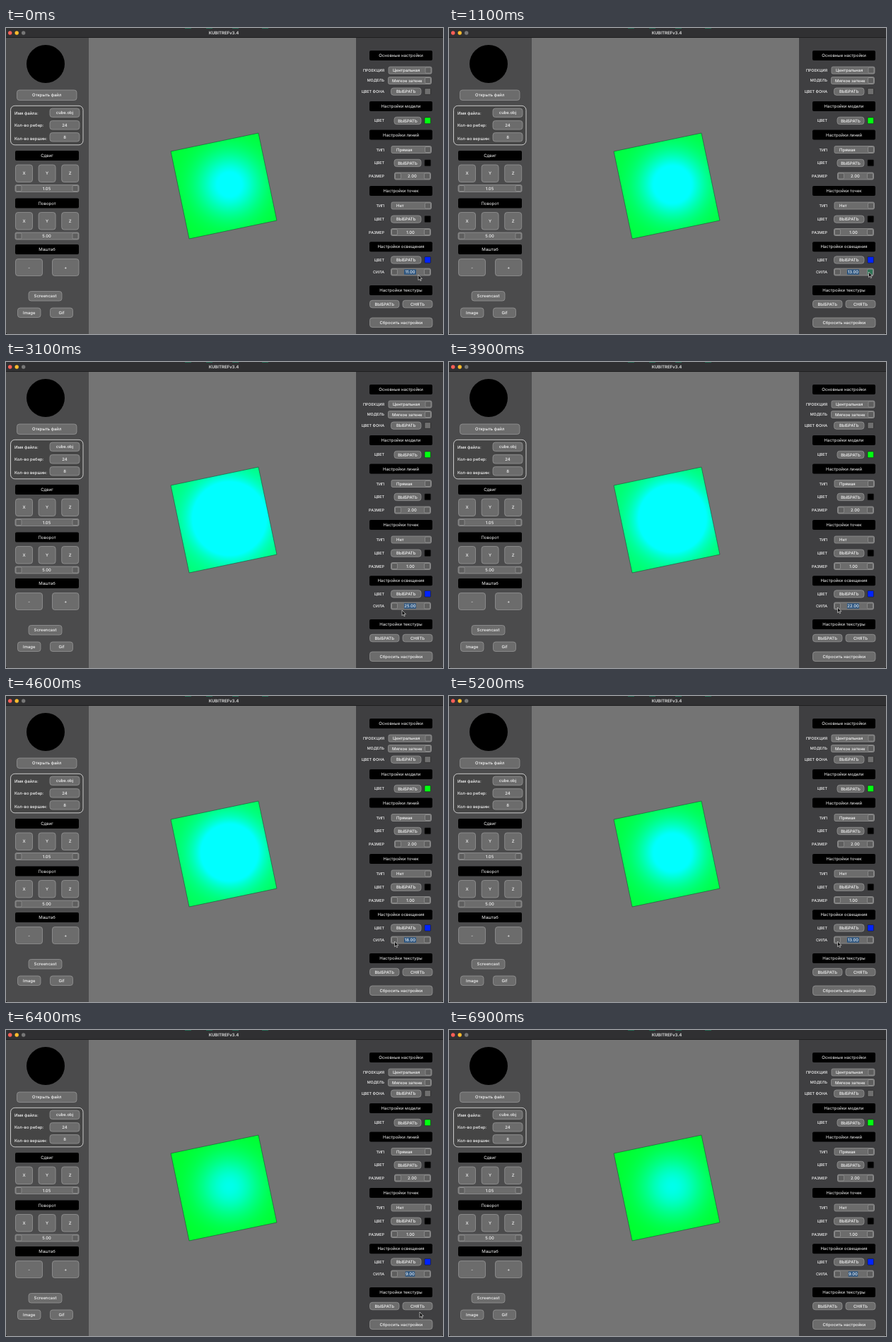
An HTML page that plays this animation: 618 px wide and 434 px high, repeating every 7.3 s.

```html
<!DOCTYPE html>
<html lang="ru">
<head>
<meta charset="utf-8">
<title>3D</title>
<style>
html, body { margin: 0; width: 100%; height: 100%; overflow: hidden; background: #1c1c1c; }
svg {
  display: block; width: 618px; height: 434px; border-radius: 0 0 4px 4px;
  font: 500 5.9px Inter, Roboto, sans-serif; fill: #f6f6f6; text-rendering: geometricPrecision;
}
.btn { fill: #6c6c6c; stroke: #9c9c9c; stroke-width: .7; }
.cap { fill: #000; }
.nub { fill: #5e5e5e; stroke: #a0a0a0; stroke-width: .6; }
.label { font-size: 5.4px; }
</style>
</head>
<body>
<svg id="stage" viewBox="0 0 618 434"></svg>
<script>
const LOOP = 7300, TICK = 100;
const stage = document.getElementById("stage");

function add(tag, attrs, parent = stage, text) {
  const el = document.createElementNS("http://www.w3.org/2000/svg", tag);
  for (const k in attrs) el.setAttribute(k, attrs[k]);
  if (text !== undefined) el.textContent = text;
  return parent.appendChild(el);
}
const rect = (x, y, width, height, attrs) => add("rect", { x, y, width, height, ...attrs });
const text = (x, y, str, attrs) => add("text", { x, y, ...attrs }, stage, str);
const mid = (x, y, str, attrs) => text(x, y, str, { "text-anchor": "middle", ...attrs });

function button(x, y, w, h, str, r = 3.5) {
  rect(x, y, w, h, { class: "btn", rx: r });
  return mid(x + w / 2, y + h / 2 + 2.1, str);
}
function caption(x, y, w, str) {
  rect(x, y, w, 14, { class: "cap", rx: 2 });
  mid(x + w / 2, y + 9.2, str, { "font-size": 6, "font-weight": 400 });
}
function spin(x, y, w, h, str) {
  rect(x, y, w, h, { class: "btn", rx: 2 });
  rect(x + 1, y + 1, 8, h - 2, { class: "nub", rx: 1.5 });
  const up = rect(x + w - 9, y + 1, 8, h - 2, { class: "nub", rx: 1.5 });
  const value = mid(x + w / 2 - .5, y + h / 2 + 2.1, str);
  return { up, value };
}
function combo(x, y, w, tx, str) {
  rect(x, y, w, 10, { class: "btn", rx: 2 });
  text(tx, y + 7, str);
  rect(x + w - 9, y + 1, 8, 8, { class: "nub", rx: 1.5 });
}
const label = (y, str) => text(535, y, str, { class: "label", "text-anchor": "end" });
const swatch = (y, fill) => rect(592, y, 8.6, 8.8, { fill, stroke: "#1c1c1c", "stroke-width": .6, rx: 1 });

const defs = add("defs", {});

// Window
rect(0, 0, 618, 434, { fill: "#747474" });
rect(0, 14, 117, 420, { fill: "#4b4b4c" });
rect(495, 14, 123, 420, { fill: "#3f3f41" });
rect(0, 0, 618, 14, { fill: "#303032" });
rect(0, 13.3, 618, .7, { fill: "#191919" });
[253, 283, 320, 362].forEach(x => rect(x, 0, 9, .8, { fill: "#23765c" }));
["#ff5f57", "#febc2e", "#777"].forEach((fill, i) => add("circle", { cx: 5.7 + i * 9.5, cy: 7, r: 2.7, fill }));
mid(308, 9.2, "KUBITREFv3.4", { "font-size": 6, "font-weight": 700, fill: "#d0d0d0" });

// Left panel
add("circle", { cx: 56, cy: 51, r: 27, fill: "#000" });
button(15.5, 88, 84.5, 14.5, "Открыть файл");
rect(6.5, 110.3, 102.5, 55.5, { fill: "#454545", stroke: "#d8d8d8", "stroke-width": .9, rx: 6 });
[["Имя файла:", "cube.obj", 122.5, 114], ["Кол-во ребер:", "24", 140.3, 131.5], ["Кол-во вершин:", "8", 158.6, 148.5]]
  .forEach(([name, value, ly, by]) => {
    text(12, ly, name);
    button(62, by, 42, 12.5, value);
  });
[["Сдвиг", 174, "1.05"], ["Поворот", 241.5, "5.00"]].forEach(([name, y, value]) => {
  caption(13, y, 90, name);
  ["X", "Y", "Z"].forEach((axis, i) => button(13.5 + i * 32.6, y + 20, 24, 24.5, axis));
  spin(13, y + 48.5, 90, 10, value);
});
caption(13, 307, 90, "Маштаб");
button(13.5, 327.5, 38, 24, "-");
button(65.5, 327.5, 37.5, 24, "+");
button(32, 373.5, 47, 13.5, "Screencast");
button(16.5, 397, 32.5, 13.5, "Image");
button(62.5, 397, 32, 13.5, "Gif");

// Right panel
[["Основные настройки", 32], ["Настройки модели", 104], ["Настройки линий", 144.5],
 ["Настройки точек", 224], ["Настройки освещения", 303.2], ["Настройки текстуры", 365]]
  .forEach(([name, y]) => caption(514, y, 89, name));
[["ПРОЕКЦИЯ", 62], ["МОДЕЛЬ", 76.3], ["ЦВЕТ ФОНА", 92], ["ЦВЕТ", 133.2], ["ТИП", 174.5], ["ЦВЕТ", 193.3],
 ["РАЗМЕР", 212], ["ТИП", 254], ["ЦВЕТ", 273], ["РАЗМЕР", 291.5], ["ЦВЕТ", 330.7], ["СИЛА", 348]]
  .forEach(([name, y]) => label(y, name));
combo(541, 55, 61, 547, "Центральная");
combo(540.5, 69.5, 61, 546, "Мягкое затене");
combo(545, 167.5, 56.5, 552, "Прямая");
combo(545, 247, 56.5, 552, "Нет");
[[544.5, 85, "#6f6f6f"], [549, 126.3, "#00ff10"], [549, 186.3, "#000"], [544.5, 266, "#000"], [544.5, 323.8, "#0023ff"]]
  .forEach(([x, y, fill]) => {
    button(x, y, 587 - x, 10.3, "ВЫБРАТЬ");
    swatch(y + .6, fill);
  });
spin(549.5, 205, 51, 10, "2.00");
spin(544.5, 284.5, 56, 10, "1.00");
const power = spin(544.5, 341, 56, 10, "");
power.value.setAttribute("x", 571.5);
const selection = add("rect", { y: 342.3, height: 7.4, fill: "#2c5580" });
stage.insertBefore(selection, power.value);
button(514.5, 386.3, 41.5, 10.5, "ВЫБРАТЬ");
button(561, 386.3, 42, 10.5, "СНЯТЬ");
button(514.5, 411, 88.5, 13.5, "Сбросить настройки");

// Lit face: even diffuse light plus a round highlight
const DIFFUSE = .018, SPECULAR = .084, FALLOFF = .00049, REACH = 100, RINGS = 50;
const glow = add("radialGradient", { id: "glow", gradientUnits: "userSpaceOnUse", cx: 316, cy: 222, r: REACH }, defs);
const stops = Array.from({ length: RINGS + 1 }, (_, i) => add("stop", { offset: i / RINGS }, glow));
add("path", {
  d: "M233 175L357 149L383 273L259 299Z", fill: "url(#glow)",
  stroke: "#1c4a34", "stroke-width": .6
});

const cursor = add("path", {
  d: "M0 0V7.6L1.8 6L3 8.7L4.2 8.2L3 5.6H5.4Z", fill: "#111", stroke: "#eee", "stroke-width": .6
});

const START = 11;
const UP = [800, 900, 1200, 1400, 1500, 1700, 1900, 2000, 2100, 2300, 2400, 2500, 2700, 2800];
const DOWN = [3500, 3700, 3800, 4000, 4200, 4300, 4500, 4700, 4800, 5000, 5100, 5200, 5400, 5500, 5800, 6000];
const PATH = [[0, 583, 350], [600, 593.5, 346], [2800, 593.5, 346], [3100, 560, 352], [3400, 549.5, 348],
  [6100, 549.5, 348], [6400, 585, 400], [6600, 622, 436], [LOOP, 622, 436]];

const passed = (times, t) => times.filter(s => s <= t).length;

function cursorAt(t) {
  const i = PATH.findIndex(p => p[0] > t);
  const [t0, x0, y0] = PATH[i - 1], [t1, x1, y1] = PATH[i];
  const k = (t - t0) / (t1 - t0);
  return [x0 + (x1 - x0) * k, y0 + (y1 - y0) * k];
}

let shown = -1;
function light(force) {
  if (force === shown) return;
  shown = force;
  stops.forEach((stop, i) => {
    const r = i / RINGS * REACH;
    const level = force * (DIFFUSE + SPECULAR * Math.exp(-FALLOFF * r * r));
    stop.setAttribute("stop-color", `rgb(0,255,${Math.round(255 * Math.min(1, level))})`);
  });
  power.value.textContent = force.toFixed(2);
  const w = force < 10 ? 13.5 : 17;
  selection.setAttribute("x", 571.5 - w / 2);
  selection.setAttribute("width", w);
}

function draw() {
  const t = Math.floor(performance.now() % LOOP / TICK) * TICK;
  light(START + passed(UP, t) - passed(DOWN, t));
  power.up.style.fill = t === 1100 ? "#2f7355" : "";
  cursor.setAttribute("transform", `translate(${cursorAt(t)})`);
  requestAnimationFrame(draw);
}
draw();
</script>
</body>
</html>
```
